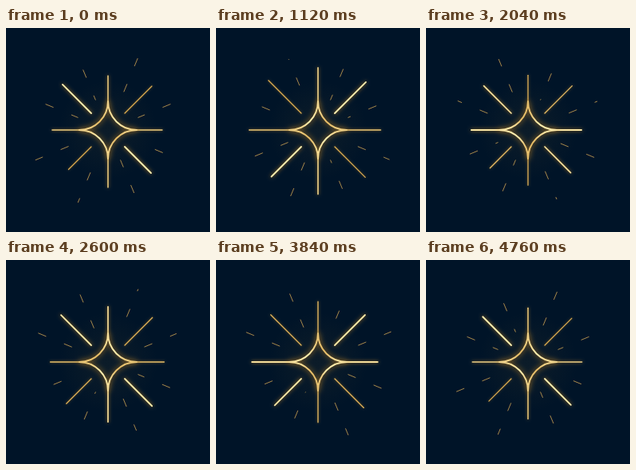
An HTML page with a canvas for the animation above (4800 ms loop, 256x256 px).

```html
<!DOCTYPE html>
<html lang="en">
<head>
<meta charset="utf-8">
<title>Sparkle</title>
<style>
  html, body { margin: 0; width: 100%; height: 100%; overflow: hidden; background: #001428; }
  canvas { display: block; width: 100vw; height: 100vh; }
</style>
</head>
<body>
<canvas id="stage"></canvas>
<script>
const SIZE = 256;
const PULSE = 2400;
const TAU = Math.PI * 2;
const STAR = 36;     // tip radius of the star, also the radius of its arcs
const GAP = 35;      // distance between sparks on one line
const INNER = 41;    // radius where sparks appear
const SPARK = 5;     // half length of a spark

// Clockwise from east: mean tip radius, swing, phase of longest
const rays = [
  [73.0, 6.2, 0.40],
  [79.9, 4.4, 0.40],
  [75.8, 6.5, 0.35],
  [75.8, 8.4, 0.37],
  [78.0, 8.4, 0.45],
  [83.9, 5.5, 0.35],
  [72.9, 5.2, 0.45],
  [81.3, 3.7, 0.45]
];

// Clockwise from east-south-east: starting offset, sway
const sparks = [
  [34.5, -0.5], [12.6, -2.5], [26.5, 1.5], [22.4, 1.5],
  [10.4, -1], [6.4, 0], [20, 2], [12, -2.5]
];

const canvas = document.getElementById("stage");
const ctx = canvas.getContext("2d");
const scale = window.devicePixelRatio || 1;
canvas.width = canvas.height = SIZE * scale;

const wave = (p, peak) => Math.cos(TAU * (p - peak));
const mix = (a, b, k) => Math.round(a + (b - a) * k);
const gold = k => `rgb(${mix(222, 255, k)},${mix(174, 238, k)},${mix(82, 175, k)})`;

// The shine crosses the rays clockwise and the star the other way
const rayLight = (angle, p) => 0.5 + 0.5 * Math.cos(2 * angle - TAU * (p + 0.25));
const starLight = (angle, p) => 0.6 + 0.4 * Math.cos(2 * angle + TAU * (p + 0.25));

function glow(blur, alpha) {
  ctx.shadowColor = `rgba(255,165,30,${alpha})`;
  ctx.shadowBlur = blur * scale;
}

function radial(angle, from, to) {
  const c = Math.cos(angle), s = Math.sin(angle);
  ctx.moveTo(c * from, s * from);
  ctx.lineTo(c * to, s * to);
}

function drawHalo() {
  const halo = ctx.createRadialGradient(0, 0, 10, 0, 0, 62);
  halo.addColorStop(0, "rgba(150,120,50,0.08)");
  halo.addColorStop(1, "rgba(150,120,50,0)");
  ctx.fillStyle = halo;
  ctx.fillRect(-70, -70, 140, 140);
}

function drawRays(p) {
  rays.forEach(([mean, swing, longest], i) => {
    const angle = i * TAU / 8;
    const light = rayLight(angle, p);
    glow(3 + 2 * light, 0.4 + 0.3 * light);
    ctx.strokeStyle = gold(light);
    ctx.lineWidth = 1.2 + 0.7 * light;
    ctx.beginPath();
    radial(angle, i % 2 ? 29.7 : STAR - 3, mean + swing * wave(p, longest));
    ctx.stroke();
  });
}

function drawStar(p) {
  const shine = ctx.createConicGradient(0, 0, 0);
  for (let i = 0; i <= 16; i++) {
    shine.addColorStop(i / 16, gold(starLight(i / 16 * TAU, p)));
  }
  ctx.beginPath();
  ctx.moveTo(STAR, 0);
  for (let i = 0; i < 4; i++) {
    const mid = (i + 0.5) * TAU / 4;
    const far = STAR * Math.SQRT2;
    ctx.arc(Math.cos(mid) * far, Math.sin(mid) * far, STAR,
      mid + TAU * 5 / 8, mid + TAU * 3 / 8, true);
  }
  glow(7, 0.85);
  ctx.strokeStyle = shine;
  ctx.lineWidth = 2;
  ctx.stroke();
}

function drawSparks(p) {
  const travel = 4 * GAP * p - 2.7 + 2.7 * Math.cos(TAU * p) - 3 * Math.sin(TAU * p);
  ctx.shadowBlur = 0;
  ctx.strokeStyle = "#bd9750";
  ctx.lineWidth = 0.9;
  ctx.beginPath();
  sparks.forEach(([offset, sway], i) => {
    const shift = sway * Math.cos(TAU * p);
    const outer = 96 + 1.5 * shift;
    const base = (offset + travel + shift + GAP) % GAP;
    for (let r = base + GAP; r < outer + SPARK; r += GAP) {
      const from = Math.max(r - SPARK, INNER);
      const to = Math.min(r + SPARK, outer);
      if (to > from) radial((i + 0.5) * TAU / 8, from, to);
    }
  });
  ctx.stroke();
}

function draw(now) {
  const p = (now % PULSE) / PULSE;
  ctx.setTransform(scale, 0, 0, scale, 0, 0);
  ctx.shadowBlur = 0;
  ctx.fillStyle = "#001428";
  ctx.fillRect(0, 0, SIZE, SIZE);
  ctx.translate(SIZE / 2, SIZE / 2);
  ctx.lineCap = "round";
  ctx.lineJoin = "round";
  drawHalo();
  drawSparks(p);
  drawRays(p);
  drawStar(p);
}

const begin = performance.now();
function tick() {
  draw(performance.now() - begin);
  requestAnimationFrame(tick);
}
tick();
</script>
</body>
</html>
```
